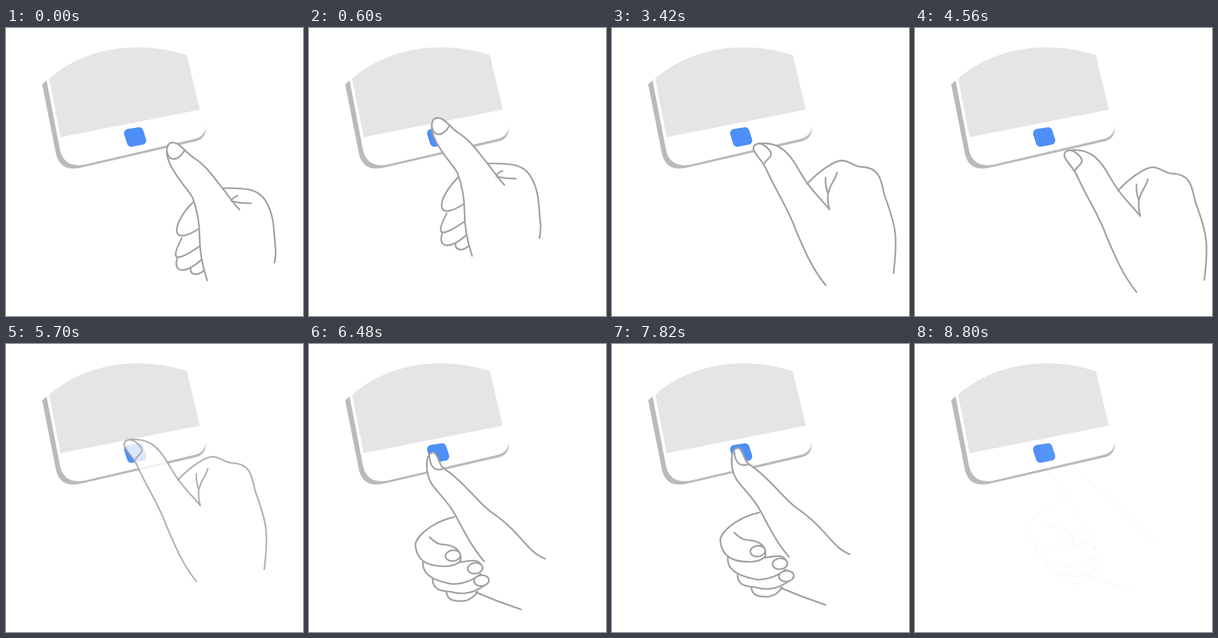
An HTML page with a canvas for the animation above (9.03 s loop, 468 by 455 pixels).

```html
<!DOCTYPE html>
<html lang="en">
<head>
<meta charset="utf-8">
<title>Fingerprint setup</title>
<style>
  html, body { margin: 0; width: 100%; height: 100%; overflow: hidden; background: #fff; }
  canvas { display: block; }
</style>
</head>
<body>
<canvas id="stage" width="468" height="455"></canvas>
<script>
const ctx = document.getElementById('stage').getContext('2d');
const LOOP = 9030, STEP = 60;

// Each hand has a white-filled finger and the open lines drawn over it.
const thumbFront = {
  finger: `M317 399 C309 375 305 355 305 329 C305 308 302 290 294 268 C288 257 270 238 261 220
    C250 200 251 181 263 181 C274 181 284 198 297 206 C314 216 329 238 341 253 C350 264 358 277 368 287`,
  lines: `M254 196 C256 210 270 212 281 194
    M341 253 C370 253 399 251 411 277 C424 298 422 330 425 350 Q425 362 423 371
    M355 273 Q359 266 365 265 M357 274 Q370 277 386 277
    M294 276 C262 308 256 348 304 317
    M277 332 C265 355 255 380 306 344
    M270 364 C263 383 278 392 307 367
    M291 380 C290 391 302 392 312 383`
};

const indexFinger = {
  finger: `M349 417 C325 387 314 357 302 330 C292 300 271 268 257 237 C251 222 239 212 236 204
    C233 196 240 193 246 193 C277 190 293 209 308 237 C322 262 338 277 355 297`,
  lines: `M244 193 C253 194 264 205 263 211 C261 217 256 218 252 225
    M320 257 C334 241 362 219 376 220 C389 222 393 229 405 230 C440 231 436 260 443 278 C460 325 463 340 456 398
    M367 239 C363 256 346 264 355 297 M349 247 Q348 260 353 273`
};

const thumbSide = {
  finger: `M275 345 C256 323 245 300 231 274 C220 252 202 237 192 222 C182 204 182 174 195 173
    C202 174 204 192 211 198 C241 217 266 252 286 267 C336 301 341 329 371 341`,
  lines: `M189 179 C190 192 195 200 203 200 Q210 201 211 197
    M228 275 C190 284 166 308 167 320 C170 350 195 353 215 353 Q232 352 238 344
    M189 307 C203 319 204 318 215 319 C232 321 240 331 238 344
    M179 345 C176 369 203 377 225 381 Q250 381 270 365 M234 347 C262 342 268 342 272 354
    M194 373 C194 390 207 392 222 393 C242 399 258 395 276 383
    M216 394 C217 408 232 408 240 408 Q254 408 265 393
    M262 394 Q297 409 333 421`,
  nails: [[226, 336], [261, 356], [271, 375.5]]
};

const press = (start, steps, power = 1.5) => ({ start, steps, power, target: 1 });
const lift = (start, steps) => ({ start, steps, power: 1, target: 0 });

const scenes = [
  { hand: thumbFront, from: 0, away: [0, 0], pressed: [-60, -39],
    moves: [press(60, 10), lift(1140, 7), press(1560, 10, 1.35)], fade: { start: 2580, steps: 7 } },
  { hand: indexFinger, from: 3180, away: [0, 0], pressed: [-49, -42],
    moves: [press(3240, 10), lift(4140, 8), press(4920, 7)], fade: { start: 5700, steps: 5 } },
  { hand: thumbSide, from: 6120, away: [-9, 22], pressed: [12, -29],
    moves: [press(6180, 10), lift(7000, 6), press(7580, 7)], fade: { start: 8500, steps: 6.3 } }
];

// Motion advances in whole steps, the first one landing at the start time.
function progress(t, { start, steps }) {
  if (t < start) return 0;
  return Math.min(Math.floor(steps), Math.floor((t - start) / STEP) + 1) / steps;
}

function fillPath(color, d) {
  ctx.fillStyle = color;
  ctx.fill(new Path2D(d));
}

function drawDevice() {
  fillPath('#bababa', 'M57 89 L65 82 L300 120 L315 157 Q315 175 299 179 L116 221 Q86 227 79 200 Z');
  fillPath('#fff', 'M64 83 L68 78 L285 43 L315 156 Q313 171 298 175 L123 216 Q91 221 85 192 Z');
  fillPath('#e5e5e5', 'M68 80 C122 33 205 17 285 43 L305.5 129 L86 172.5 Z');

  // Round joins give the sensor its soft corners.
  const sensor = new Path2D('M193 166.5 L209.500 163.800 L214 177.500 L197.500 180.700 Z');
  ctx.fillStyle = ctx.strokeStyle = '#4e8ff8';
  ctx.lineWidth = 14;
  ctx.lineJoin = 'round';
  ctx.fill(sensor);
  ctx.stroke(sensor);
}

function drawHand({ finger, lines, nails = [] }) {
  ctx.strokeStyle = '#a1a1a1';
  ctx.lineWidth = 2.6;
  ctx.lineCap = ctx.lineJoin = 'round';
  fillPath('#fff', finger);
  ctx.stroke(new Path2D(finger));
  ctx.stroke(new Path2D(lines));
  for (const [x, y] of nails) {
    ctx.beginPath();
    ctx.ellipse(x, y, 11.8, 8.5, -0.1, 0, Math.PI * 2);
    ctx.fill();
    ctx.stroke();
  }
}

function drawScene({ hand, away, pressed, moves, fade }, t) {
  const amount = moves.reduce((p, m) => p + (m.target - p) * progress(t, m) ** m.power, 0);
  const [x, y] = away.map((a, i) => a + (pressed[i] - a) * amount);
  ctx.save();
  ctx.globalAlpha = 1 - progress(t, fade);
  ctx.translate(x, y);
  drawHand(hand);
  ctx.restore();
}

function render() {
  const t = performance.now() % LOOP;
  ctx.fillStyle = '#fff';
  ctx.fillRect(0, 0, 468, 455);
  drawDevice();
  drawScene(scenes.filter(s => t >= s.from).pop(), t);
  requestAnimationFrame(render);
}
render();
</script>
</body>
</html>
```
